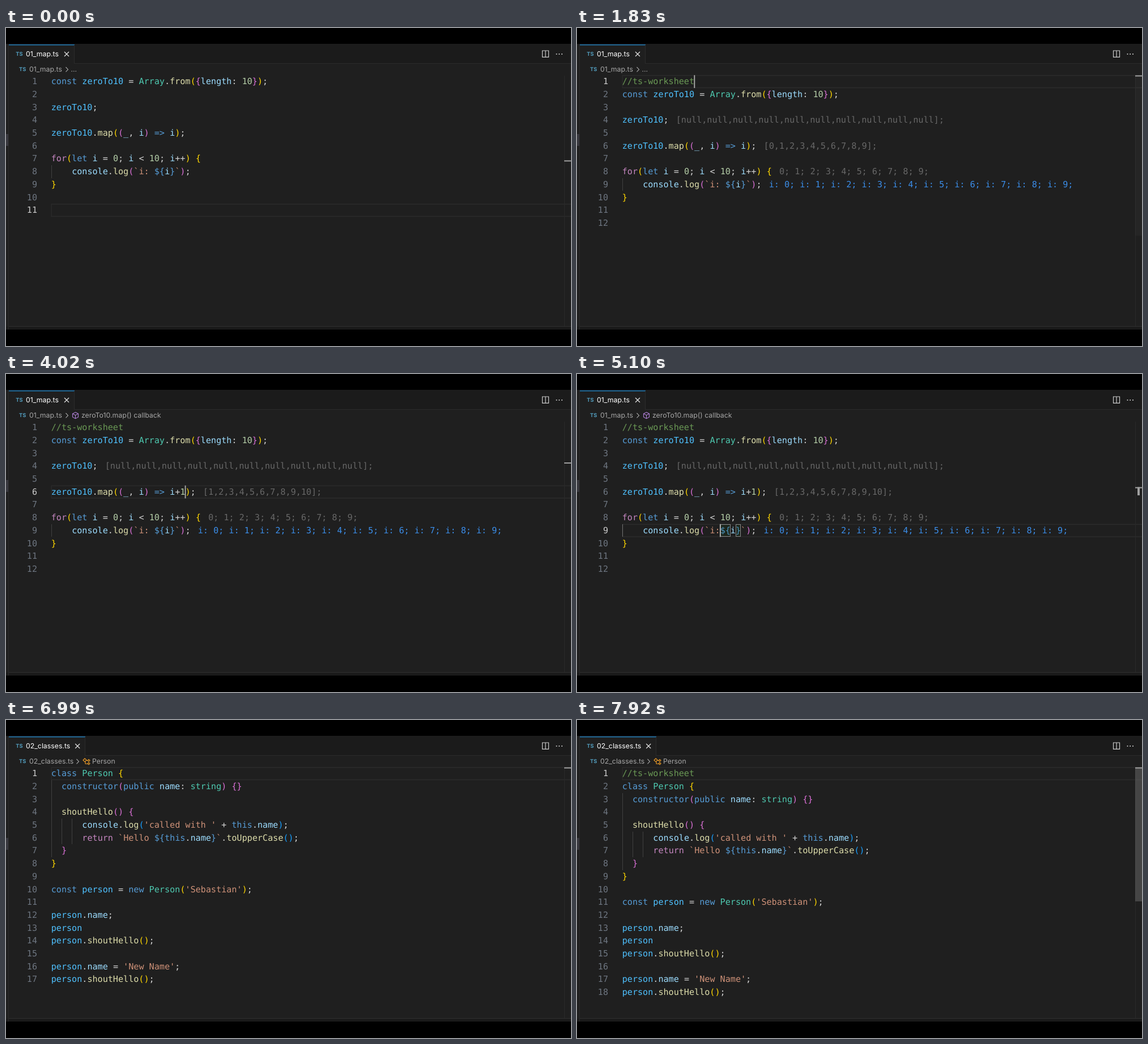
An HTML page that plays this animation: 997x561 px, repeating every 8 s.

```html
<!DOCTYPE html>
<html lang="en">
<head>
<meta charset="utf-8">
<title>Editor worksheet</title>
<style>
html, body { margin: 0; width: 100%; height: 100%; overflow: hidden; background: #000; }
body { position: relative; text-rendering: geometricPrecision; }
svg, div { position: absolute; }
svg { left: 0; top: 0; }
svg text { font: 12.3px Inter, sans-serif; fill: #a6a6a6; }
svg .ts { font-size: 9.4px; font-weight: 700; fill: #519aba; }
#code { font: 15.12px/22.7px "DejaVu Sans Mono", monospace; color: #d4d4d4; white-space: pre;
  font-variant-ligatures: none; }
.num { left: 0; width: 55px; text-align: right; color: #6e7681; }
.num.on { color: #ccc; }
.row { left: 79.7px; }
.out { margin-left: 13.2px; color: #686868; }
.log { color: #3b8eea; }
.guide { width: 1px; height: 22.7px; background: #404040; }
.box { border: 1px solid #888; box-sizing: border-box; height: 22.7px; background: #0064001a; }
</style>
</head>
<body>
<svg id="back" width="997" height="561"></svg>
<div id="code"></div>
<svg id="front" width="997" height="561"></svg>
<script>
const LOOP = 8000, X = 79.7, Y = 83.2, CH = 9.1, LH = 22.7, TOP = 84, VIEW = 442;
const $ = id => document.getElementById(id);
const esc = s => s.replace(/&/g, '&amp;').replace(/</g, '&lt;');
const rect = (x, y, w, h, c, extra = '') =>
  `<rect x="${x}" y="${y}" width="${w}" height="${h}" fill="${c}" ${extra}/>`;
const path = (d, c, w = 1.1) => `<path d="${d}" fill="none" stroke="${c}" stroke-width="${w}"/>`;
const text = (x, y, s, extra = '') => `<text x="${x}" y="${y}" ${extra}>${esc(s)}</text>`;
const div = (cls, x, y, style = '', s = '') =>
  `<div class="${cls}" style="left:${x}px;top:${y}px;${style}">${s}</div>`;

// Each step overrides part of the state; setting row or col restarts the cursor blink.
const steps = [
  [0, { file: '01_map.ts', row: 11, col: 0, crumb: '...', add: '', gap: ' ', out: 0 }],
  [480, { row: 1, focus: 1 }],
  [540, { head: '', row: 2, dirty: 1 }],
  [600, { row: 1 }],
  [750, { head: '//ts-worksheet', col: 14 }],
  [1290, { dirty: 0 }],
  [1680, { out: 1 }],
  [2640, { row: 6, col: 24 }],
  [2790, { add: '+', col: 25, dirty: 1 }],
  [2880, { add: '+1', col: 26 }],
  [3000, { dirty: 0 }],
  [3150, { crumb: 'zeroTo10.map() callback' }],
  [3300, { out: 2 }],
  [4740, { row: 9, col: 20 }],
  [4890, { gap: '', col: 19, dirty: 1 }],
  [5040, { dirty: 0 }],
  [5190, { col: 19 }],
  [5280, { out: 3 }],
  [5370, { crumb: '...' }],
  [6720, { file: '02_classes.ts', crumb: 'Person', head: undefined, row: 1, col: 0, focus: 0 }],
  [7170, { head: '', row: 2, focus: 1, dirty: 1 }],
  [7200, { row: 1 }],
  [7230, { head: '//ts-worksheet', col: 14 }],
  [7680, { dirty: 0 }],
];

function stateAt(t) {
  const s = {};
  for (const [at, change] of steps) {
    if (at > t) break;
    Object.assign(s, change);
    if ('row' in change || 'col' in change) s.moved = at;
  }
  s.caret = s.focus && Math.floor((t - s.moved) / 500) % 2 === 0;
  s.first = s.file[1] === '1';
  s.slider = s.first
    ? (t < 540 ? 0 : Math.max(0, Math.min(1, (1950 - t) / 720)))
    : (t < 7170 ? 0 : 1);
  return s;
}

const mapCode = s => `const zeroTo10 = Array.from({length: 10});

zeroTo10;

zeroTo10.map((_, i) => i${s.add});

for(let i = 0; i < 10; i++) {
    console.log(\`i:${s.gap}\${i}\`);
}

`;
const classCode = `class Person {
  constructor(public name: string) {}

  shoutHello() {
      console.log('called with ' + this.name);
      return \`Hello \${this.name}\`.toUpperCase();
  }
}

const person = new Person('Sebastian');

person.name;
person
person.shoutHello();

person.name = 'New Name';
person.shoutHello();`;

function wordColor(w, next) {
  if (/^(const|let|class|constructor|public|new|this)$/.test(w)) return '#569cd6';
  if (/^(for|return)$/.test(w)) return '#c586c0';
  if (/^(Array|Person|string)$/.test(w)) return '#4ec9b0';
  if (/^(zeroTo10|person)$/.test(w)) return '#4fc1ff';
  if (/^\d/.test(w)) return '#b5cea8';
  return next === '(' ? '#dcdcaa' : '#9cdcfe';
}

function highlighter() {
  const brackets = ['#ffd700', '#da70d6', '#179fff'];
  let depth = 0;
  return line => {
    let quoted = false, hole = false;
    return line.replace(/\/\/.*|'[^']*'|`|\$\{|=>|\w+|[^\w]/g, (tok, pos) => {
      let c = '#d4d4d4';
      if (tok.startsWith('//')) c = '#6a9955';
      else if (tok === '`') { quoted = !quoted; c = '#ce9178'; }
      else if (tok === '${') { hole = true; c = '#569cd6'; }
      else if (hole && tok === '}') { hole = false; c = '#569cd6'; }
      else if (tok[0] === "'" || quoted && !hole) c = '#ce9178';
      else if (tok === '=>') c = '#569cd6';
      else if (/[({]/.test(tok)) c = brackets[depth++ % 3];
      else if (/[)}]/.test(tok)) c = brackets[--depth % 3];
      else if (/\w/.test(tok)) c = wordColor(tok, line[pos + tok.length]);
      return `<span style="color:${c}">${esc(tok)}</span>`;
    });
  };
}

const list = (f, sep) => Array.from({ length: 10 }, (_, i) => f(i)).join(sep);
function output(line, out) {
  if (!out) return '';
  const show = (s, cls = '') => `<span class="out ${cls}">${s}</span>`;
  if (line === 'zeroTo10;') return show(`[${list(() => 'null', ',')}];`);
  if (line.startsWith('zeroTo10.map')) return show(`[${list(i => i + (out > 1), ',')}];`);
  if (line.startsWith('for')) return show(list(i => `${i};`, ' '));
  if (line.includes('console')) return show(list(i => `i:${out > 2 ? '' : ' '}${i};`, ' '), 'log');
  return '';
}

function codeHtml(s, lines) {
  const paint = highlighter(), tab = s.first ? 4 : 2;
  const indent = l => l.search(/\S/);
  let html = '';
  lines.forEach((line, k) => {
    const y = Y + k * LH, active = k + 1 === s.row;
    html += div(active ? 'num on' : 'num', 0, y, '', k + 1);
    const depth = indent(line || lines[k + 1] || '');
    for (let g = 0; g < depth; g += tab)
      html += div('guide', X + g * CH, y, active ? 'background:#707070' : '');
    html += div('row', X, y, '', paint(line) + output(line, s.first && s.out));
  });
  if (s.first && s.row === 9) {
    const y = Y + 8 * LH, at = lines[8].indexOf('$');
    html += div('box', X + at * CH, y, `width:${2 * CH}px`) + div('box', X + (at + 3) * CH, y, `width:${CH}px`);
  }
  return html;
}

function backSvg(s) {
  const tabEnd = s.first ? 120 : 139, line = '#2b2b2b';
  return rect(0, 28, 997, 504, '#1f1f1f') + rect(5, 29, 992, 33, '#1b1b1b') +
    rect(5, 62, 992, 1, line) + rect(5, 29, tabEnd - 5, 34, '#1f1f1f') +
    rect(5, 29, tabEnd - 4, 1.5, '#1c78b4') + rect(tabEnd, 30, 1, 33, line) +
    rect(0, 527, 997, 5, '#1a1a1a') + rect(5, 526, 992, 1, '#303030') +
    rect(4, 29, 1, 503, line) + rect(0, s.first ? 187 : 208, 4, 21, '#37373d') +
    rect(X + .5, Y + (s.row - 1) * LH + .5, 930, LH - 1, 'none', 'stroke="#2b2b2b" stroke-width="1.5"') +
    rect(985, TOP, 1, VIEW, '#292929');
}

function crumbSvg(s) {
  const x = s.first ? 100 : 119;
  let out = text(23, 76, 'TS', 'class="ts"') + text(41, 77.3, s.file) +
    path(`M${x + 5.5} 69l4 4.2l-4 4.2`, '#a6a6a6');
  if (s.crumb === '...') return out + text(x + 14.5, 77.3, '...');
  if (s.first) {
    return out + path('M122.5 67.5l5 2.6v5.8l-5 2.8l-5-2.8v-5.8zM117.5 70.1l5 2.6l5-2.6M122.5 72.7v6', '#b180d7') +
      text(133, 77.3, s.crumb);
  }
  return out + path('M136 71l3-3.2l3 2.8l-3 3.2zM141 71.5h3M140 73v4.2h4M144 71.5l2-2l2 1.8l-2 2zM144 77l2-2l2 1.8l-2 2z', '#ee9d28') +
    text(152, 77.3, s.crumb);
}

function frontSvg(s, count) {
  const x = s.first ? 107 : 126.2, scale = VIEW / (VIEW + (count - 1) * LH);
  const markY = TOP - .5 + (s.row - 1) * LH * scale;
  let out = text(17.3, 49.2, 'TS', 'class="ts"') + text(35, 50.4, s.file, 'style="fill:#fff"') + crumbSvg(s);
  out += s.dirty ? `<circle cx="${x}" cy="46" r="4" fill="#fff"/>`
    : path(`M${x - 4} 42l8 8m0-8l-8 8`, '#e4e4e4', 1.2);
  out += path('M946.5 40h11v11.3h-11zM952 40v11.3', '#ccc', 1.2);
  for (const d of [971.5, 976.2, 981]) out += `<circle cx="${d}" cy="46" r="1.05" fill="#ccc"/>`;
  if (s.slider) out += rect(985, TOP, 12, VIEW * scale, '#797979', `opacity="${(.42 * s.slider).toFixed(3)}"`);
  out += rect(985, markY, 12, 2, '#a0a0a0');
  if (s.first && s.row === 9) out += rect(989, markY, 4, LH * scale, '#a0a0a0');
  if (s.caret) out += rect(X + s.col * CH - .7, Y + (s.row - 1) * LH, 1.8, LH, '#aeafad');
  return out;
}

const shown = {};
function put(id, html) {
  if (shown[id] !== html) $(id).innerHTML = shown[id] = html;
}

function draw(t) {
  const s = stateAt(t);
  const lines = (s.first ? mapCode(s) : classCode).split('\n');
  if (s.head !== undefined) lines.unshift(s.head);
  put('back', backSvg(s));
  put('code', codeHtml(s, lines));
  put('front', frontSvg(s, lines.length));
}

const start = performance.now();
function frame() {
  draw((performance.now() - start) % LOOP);
  requestAnimationFrame(frame);
}
frame();
</script>
</body>
</html>
```
